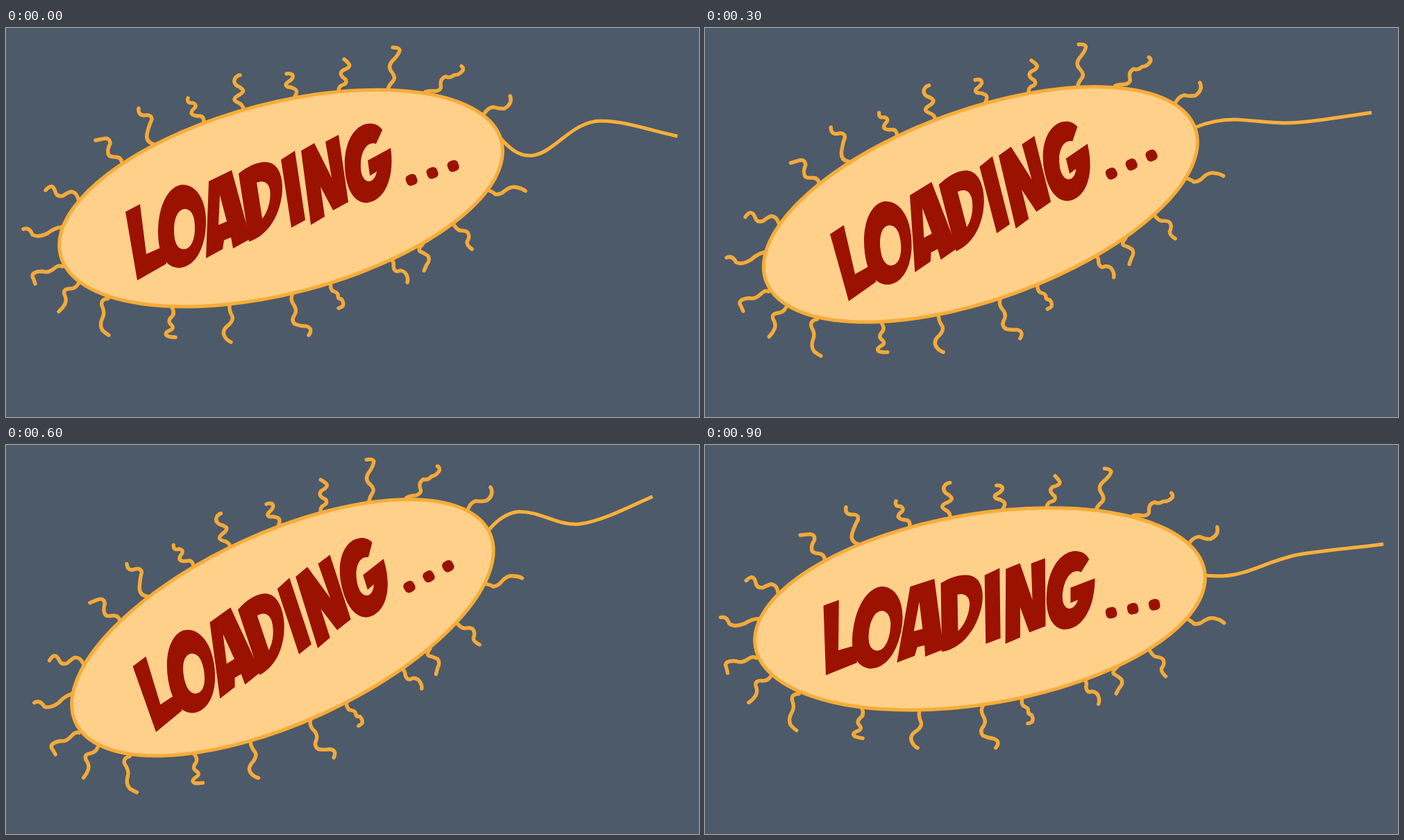
Animation of 998 by 561 pixels, one loop 1 s. Source, as an HTML page:

```html
<!DOCTYPE html>
<html lang="en">
<head>
<meta charset="utf-8">
<title>Loading</title>
<style>
  html, body { margin: 0; width: 100%; height: 100%; overflow: hidden; background: #4d5a69; }
  svg { display: block; width: 100%; height: 100%; }
  #tail, #cell { fill: none; stroke: #fbb03b; stroke-width: 5; }
  #hairs { fill: none; stroke: #f3aa3b; stroke-width: 5.4; stroke-linecap: round; stroke-linejoin: round; }
  #cell ellipse { fill: #ffd08a; stroke: #f8ad3a; }
  #word { fill: #9b1200; fill-rule: evenodd; }
</style>
</head>
<body>
<svg viewBox="0 0 998 561" role="img" aria-label="LOADING...">
  <path id="tail"/>
  <g id="cell">
    <g id="hairs">
      <path d="M550 88Q552 82 557 77Q562 72 556 64Q549 56 556 48Q566 38 567 32Q566 28 557 28"/>
      <path d="M479 91Q479 84 485 82Q492 80 489 74Q478 67 485 61Q497 57 494 52Q491 48 487 45"/>
      <path d="M416 99Q421 91 416 88Q411 85 406 85Q400 82 406 78Q416 72 412 67Q409 65 404 66"/>
      <path d="M342 117Q341 110 333 107Q325 103 333 98Q345 92 340 88Q337 85 332 83Q326 77 331 71Q334 68 337 68"/>
      <path d="M285 136Q285 127 279 127Q269 127 267 123Q267 119 272 115Q275 110 269 108Q260 109 262 101"/>
      <path d="M214 168Q201 165 203 153Q206 140 210 132Q210 124 199 126Q190 126 191 116"/>
      <path d="M167 196Q167 186 157 186Q147 186 147 180Q146 174 150 167Q150 157 139 160L129 162"/>
      <path d="M104 247Q102 237 94 236Q89 237 82 242Q73 244 71 236Q67 222 57 234"/>
      <path d="M81 287Q70 288 60 296Q46 303 38 298Q34 287 25 290"/>
      <path d="M81 344Q76 341 69 347Q60 354 53 351Q38 351 38 358Q40 362 42 369"/>
      <path d="M104 369Q100 376 92 376Q82 376 84 384Q88 392 85 398Q82 404 76 409"/>
      <path d="M147 390Q136 391 138 400Q143 411 139 418Q134 428 139 436Q143 440 148 443"/>
      <path d="M239 403Q244 412 238 417Q232 423 238 428Q243 433 236 436Q227 440 232 444Q237 446 244 446"/>
      <path d="M322 399Q321 407 325 414Q329 420 321 428Q311 435 314 443Q317 450 324 453"/>
      <path d="M413 383Q409 390 413 397Q420 406 416 413Q410 421 416 427Q424 430 432 430Q443 433 436 443"/>
      <path d="M468 367Q466 374 470 379Q479 382 478 386Q478 391 483 391Q487 396 485 401Q483 403 479 404"/>
      <path d="M556 335Q559 338 558 344Q559 351 564 351Q569 348 575 353Q580 360 578 367"/>
      <path d="M600 312Q593 319 596 322Q603 325 608 329Q611 335 606 341Q604 345 602 350"/>
      <path d="M643 281Q649 291 654 292Q665 292 666 297Q668 302 664 308Q663 313 671 319"/>
      <path d="M692 233Q701 236 705 240Q713 240 718 235Q728 227 736 230Q743 231 748 235"/>
      <path d="M689 123Q694 115 702 114Q711 117 718 116Q730 109 726 98"/>
      <path d="M604 92Q609 90 618 91Q628 90 626 82Q625 73 633 70Q639 73 645 68Q653 68 658 61Q659 57 656 55"/>
    </g>
    <ellipse rx="328" ry="137" transform="translate(396 245.5) rotate(-14.6)"/>
  </g>
  <!-- lettering, placed relative to the foot of the L -->
  <g id="word">
    <g transform="translate(-189 -364)">
      <path d="M172 265L193 254L202 326L227 315L231 340L189 364Z"/>
      <path d="M253 226C273 225 288 246 288 279C288 316 273 344 250 346C230 346 219 327 219 294C219 257 233 229 253 226ZM257 261C247 262 242 275 242 292C242 309 247 319 256 319C266 319 272 306 272 288C272 271 267 261 257 261Z"/>
      <path d="M292 221L325 205L352 304L327 318L324 302L314 306L312 319L288 332ZM308 241L318 279L306 284Z"/>
      <path d="M335 210C352 196 372 189 384 196C396 203 400 223 397 243C392 277 373 301 350 308ZM361 223L369 275C378 264 382 246 380 233C378 223 371 219 361 223Z"/>
      <path d="M396 190L416 177L431 277L411 288Z"/>
      <path d="M425 177L444 166L469 216L460 164L479 154L493 251L471 263L453 229L459 272L439 284Z"/>
      <path d="M542 147C536 138 526 136 516 139C497 146 486 172 488 203C490 235 503 253 520 252C545 249 560 217 554 173L521 191L524 213L534 207C532 217 527 222 521 221C513 219 510 207 511 194C512 176 521 163 533 167Z"/>
      <g id="dots"></g>
    </g>
  </g>
</svg>
<script>
const $ = id => document.getElementById(id);
const PIVOT = "499 241";

$("dots").innerHTML = [0, 1, 2].map(i =>
  `<rect x="-8" y="-8" width="16" height="16" rx="6" transform="translate(${584 + 30 * i} ${219 - 10 * i}) rotate(-20)"/>`
).join("");

// Each tail: a start point and three cubic segments
const down = [713,160, 729,178, 742,185, 757,184, 790,181, 815,133, 858,134, 890,134, 925,147, 967,156];
const rise = [706,147, 720,152, 730,156, 742,156, 778,154, 800,108, 842,101, 870,97, 910,98, 955,98.5];
const flat = [707,143, 724,136, 742,132, 762,132, 790,133, 810,137, 835,137, 868,137, 910,129, 960,122];
const wave = [707,143, 720,130, 733,121, 748,121, 780,122, 800,152, 832,153, 862,152, 895,140, 933,127];
const lift = [704,136, 717,123, 732,115, 750,114, 782,116, 805,133, 838,133, 868,132, 905,116, 955,98];
const calm = [716,173, 735,161, 755,155, 777,155, 800,156, 822,159, 845,158, 885,156, 930,143, 988,127];
const low = [721,188, 730,189, 737,189, 746,189, 784,187, 812,166, 855,158, 890,152, 930,149, 977,143];
const mix = (a, b) => a.map((v, i) => (v + b[i]) / 2);

// Word poses: x, y, angle
const level = [174, 332, 7.8], rest = [189, 364, 0], up = [199, 385, -3.7],
      high = [216, 414, -9.7], back = [207, 394, -5.8];

// Steps: cell angle, word pose, tail, tail angle
const steps = [
  [0, rest, down, 0],
  [-5, up, rise, 0],
  [-10, high, mix(rise, flat), -5],
  [-5, back, flat, 0],
  [0, rest, mix(flat, wave), 5],
  [-5, up, wave, 0],
  [-10, high, mix(wave, lift), -5],
  [-5, back, lift, 0],
  [0, rest, calm, 0],
  [5, level, low, 0]
];

function place(el, transform) { el.setAttribute("transform", transform); }

function draw(now) {
  const [angle, [x, y, turn], tail, swing] = steps[Math.floor(now / 100) % steps.length];
  place($("cell"), `rotate(${angle} ${PIVOT})`);
  place($("word"), `translate(${x} ${y}) rotate(${turn})`);
  place($("tail"), `rotate(${swing} ${PIVOT})`);
  $("tail").setAttribute("d", `M${tail.slice(0, 2)}C${tail.slice(2)}`);
}

const start = performance.now();
function tick() {
  draw(performance.now() - start);
  requestAnimationFrame(tick);
}
tick();
</script>
</body>
</html>
```
